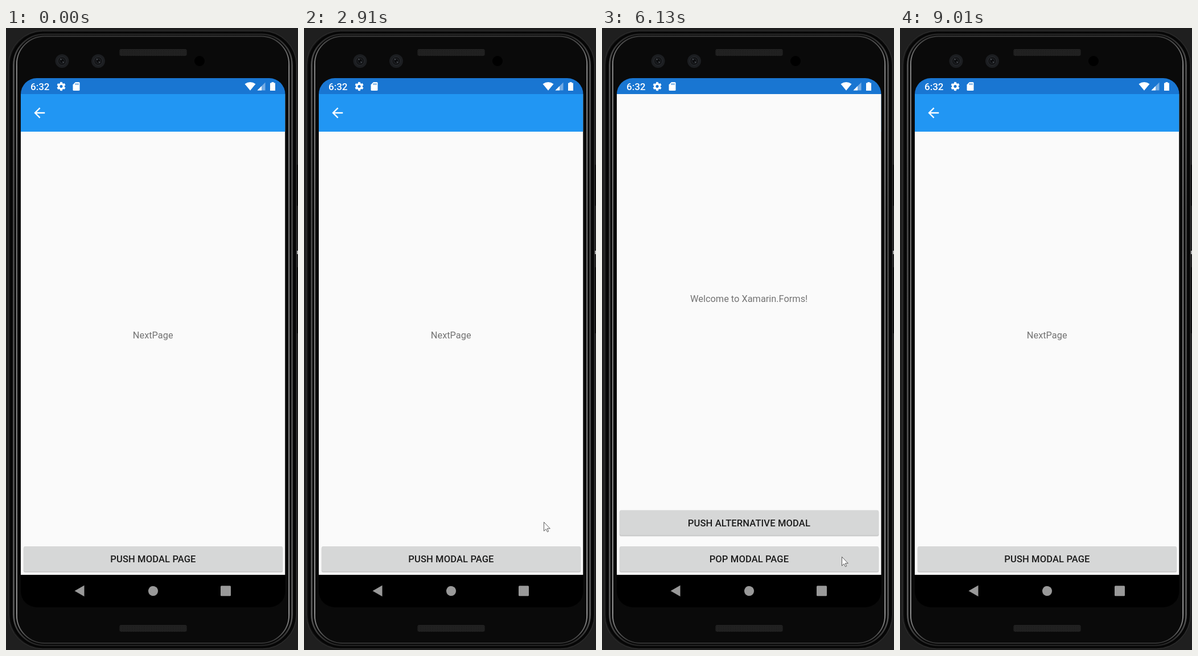
Write an HTML page that moves like this. It is 513 by 1092 pixels and loops after 9340 ms.

```html
<!DOCTYPE html>
<html lang="en">
<head>
<meta charset="utf-8">
<title>Modal page navigation</title>
<style>
html, body { margin: 0; width: 100%; height: 100%; overflow: hidden; background: #1f1f1f; }
svg { display: block; }
text { font-family: Roboto, sans-serif; text-anchor: middle; }
.label { fill: #737373; font-size: 16.35px; }
.caption { fill: #1c1c1c; font-size: 16.54px; font-weight: 500; letter-spacing: .12px; }
.clock { font-size: 17px; font-weight: 500; text-anchor: start; }
</style>
</head>
<body>
<svg id="stage" width="513" height="1092" viewBox="0 0 513 1092">
  <defs>
    <linearGradient id="metal" x1="0" y1="0" x2="0" y2="1">
      <stop offset="0" stop-color="#3a3a3a"/>
      <stop offset=".05" stop-color="#8c8c8c"/>
      <stop offset=".3" stop-color="#777"/>
      <stop offset=".6" stop-color="#888"/>
      <stop offset=".95" stop-color="#999"/>
      <stop offset="1" stop-color="#333"/>
    </linearGradient>
    <pattern id="mesh" width="3" height="3" patternUnits="userSpaceOnUse">
      <rect width="3" height="3" fill="#252525"/>
      <path d="M0 0h1v1H0zM1.5 1.5h1v1h-1z" fill="#0e0e0e"/>
    </pattern>
    <clipPath id="content"><path d="M26 116h464.5v844H26z"/></clipPath>
  </defs>

  <!-- phone body -->
  <rect x="4.5" y="5" width="506" height="1085" rx="60" fill="#161616" stroke="#333"/>
  <rect x="9" y="8.500" width="498" height="1078" rx="57" fill="#0c0c0c" stroke="#060606" stroke-width="4"/>
  <rect x="13.500" y="11" width="489" height="1073" rx="54" fill="#050505" stroke="url(#metal)" stroke-opacity=".6" stroke-width="2.500"/>
  <rect x="18.800" y="14.500" width="478.400" height="1065.500" rx="49" fill="#0a0a0a" stroke="url(#metal)" stroke-width="2"/>
  <path d="M512 240v72M512 420v116" stroke="#0a0a0a" stroke-width="2"/>
  <path d="M512 391v6" stroke="#aaa" stroke-width="2"/>
  <g fill="url(#mesh)">
    <rect x="199.500" y="37" width="118" height="12" rx="3"/>
    <rect x="199.500" y="1048" width="118" height="12" rx="3"/>
  </g>
  <g id="lenses"></g>
  <circle cx="340" cy="58" r="9" fill="#000"/>

  <!-- screen -->
  <rect x="26" y="88" width="464.500" height="929" rx="28" fill="#000"/>
  <path d="M26 116a28 28 0 0 1 28-28h408.500a28 28 0 0 1 28 28z" fill="#1976d2"/>
  <g fill="#fff">
    <text class="clock" x="43" y="109">6:32</text>
    <g fill="none" stroke="#fff" transform="translate(97 102.500) rotate(30)">
      <circle r="4.300" stroke-width="3.400"/>
      <circle r="6.500" stroke-width="2.400" pathLength="12" stroke-dasharray="1.100 .900" stroke-dashoffset=".550"/>
    </g>
    <path d="M122 95h6q1.500 0 1.500 1.500v12q0 1.500-1.500 1.500h-9q-1.500 0-1.500-1.500v-9z"/>
    <path d="M122.500 97v3M124.700 97v3M126.900 97v3" stroke="#1976d2"/>
    <path d="M419.500 98.300q9.500-6.800 19 0L429 109.800z"/>
    <path d="M455.500 95.500v14h-14z" opacity=".4"/>
    <path d="M449 102v7.500h-7.500z"/>
    <path d="M466.500 95h4v1.500h2.500v13.500h-9V96.500h2.500z"/>
  </g>

  <g clip-path="url(#content)">
    <path d="M26 116h464.500v844H26z" fill="#fafafa"/>
    <g id="page">
      <path d="M26 116h464.500v66H26z" fill="#2196f3"/>
      <path transform="translate(44.600 134.800) scale(1.1815)" fill="#fff"
        d="M20 11H7.830l5.590-5.590L12 4l-8 8 8 8 1.410-1.410L7.830 13H20z"/>
      <text class="label" x="258.200" y="545.300">NextPage</text>
    </g>
    <g id="modal">
      <path d="M26 116h464.500v844H26z" fill="#fafafa"/>
      <text class="label" x="258.200" y="480.600">Welcome to Xamarin.Forms!</text>
    </g>
  </g>

  <g fill="#999">
    <path d="M137.500 978.500v19.500L120.500 988.300z"/>
    <circle cx="258.500" cy="988.300" r="8.600"/>
    <rect x="377" y="979.300" width="18" height="18" rx="1.500"/>
  </g>
  <path id="cursor" d="M.5.5v15.600l3.600-3.400 2.500 5 2.100-1-2.400-4.900h5z" fill="#fff" stroke="#333" stroke-width=".8"/>
</svg>

<script>
const LOOP = 9340, HEIGHT = 844;
const $ = id => document.getElementById(id);
const clamp = v => Math.min(1, Math.max(0, v));
const progress = (t, from, to) => clamp((t - from) / (to - from));

for (const x of [98.5, 162]) {
  $('lenses').innerHTML += `<g transform="translate(${x} 58)">
    <circle r="12" fill="#1c1e21"/><circle r="7.5" fill="#131416" stroke="#2a2d32"/>
    <circle r="4" fill="#0c0d0f" stroke="#24272c"/>
    <path d="M-3-4l2 2M1 1l2 2" stroke="#55595e" stroke-width="1.3"/></g>`;
}

// Adds a button and returns its ripple circle.
function addButton(parent, y, caption) {
  const g = document.createElementNS('http://www.w3.org/2000/svg', 'g');
  g.innerHTML = `
    <rect x="30.500" y="${y + 1}" width="456" height="45.500" rx="3" opacity=".07"/>
    <rect x="30.800" y="${y + 1}" width="455.400" height="44.300" rx="3" opacity=".17"/>
    <rect x="31" y="${y}" width="455" height="44" rx="2.400" fill="#d6d7d7"/>
    <svg x="31" y="${y}" width="455" height="44"><circle r="0" opacity="0"/></svg>
    <text class="caption" x="258.400" y="${y + 28}">${caption}</text>`;
  $(parent).append(g);
  return g.querySelector('circle');
}

const push = addButton('page', 910, 'PUSH MODAL PAGE');
const alternative = addButton('modal', 846.5, 'PUSH ALTERNATIVE MODAL');
const pop = addButton('modal', 910, 'POP MODAL PAGE');

// Ripple, press time and tap point inside the button
const presses = [
  [push, 1150, 364, 15],
  [alternative, 2760, 390, 21],
  [push, 5210, 376, 23],
  [pop, 6840, 387, 15],
];

// Cursor stops: time, x, y
const stops = [
  [80, 476, 1067], [770, 395, 925], [1780, 395, 925], [2020, 402, 865],
  [2160, 402, 865], [2200, 418.5, 867], [2480, 419, 867], [2530, 421, 867],
  [4000, 421, 867], [4110, 413, 943], [4330, 413, 943], [4570, 407, 933],
  [5990, 407, 933], [6130, 421, 928], [6230, 421, 928], [6380, 418, 924.5],
  [8620, 418, 924.5], [9010, 470, 1094],
];

function modalOffset(t) {
  if (t < 2910) return HEIGHT * (1 - progress(t, 1376, 1676)) ** 2;
  if (t < 5370) return HEIGHT;
  if (t < 7120) return HEIGHT * (1 - progress(t, 5370, 5670)) ** 2;
  return HEIGHT * progress(t, 7120, 7420) ** 2;
}

function drawCursor(t) {
  const next = stops.findIndex(s => s[0] > t);
  $('cursor').style.display = next > 0 ? '' : 'none';
  if (next < 1) return;
  const [t0, x0, y0] = stops[next - 1], [t1, x1, y1] = stops[next];
  const p = progress(t, t0, t1), k = p * p * (3 - 2 * p);
  $('cursor').setAttribute('transform', `translate(${x0 + (x1 - x0) * k} ${y0 + (y1 - y0) * k})`);
}

function drawRipples(t) {
  for (const [ripple] of presses) ripple.setAttribute('opacity', 0);
  for (const [ripple, start, x, y] of presses) {
    const age = t - start;
    if (age < 0 || age > 550) continue;
    ripple.setAttribute('cx', x);
    ripple.setAttribute('cy', y);
    ripple.setAttribute('r', 25 + 400 * progress(age, 0, 350));
    ripple.setAttribute('opacity', 0.12 * (1 - progress(age, 250, 550)));
  }
}

function frame(now) {
  const t = now % LOOP;
  $('modal').setAttribute('transform', `translate(0 ${modalOffset(t)})`);
  drawRipples(t);
  drawCursor(t);
  requestAnimationFrame(frame);
}
requestAnimationFrame(frame);
</script>
</body>
</html>
```
